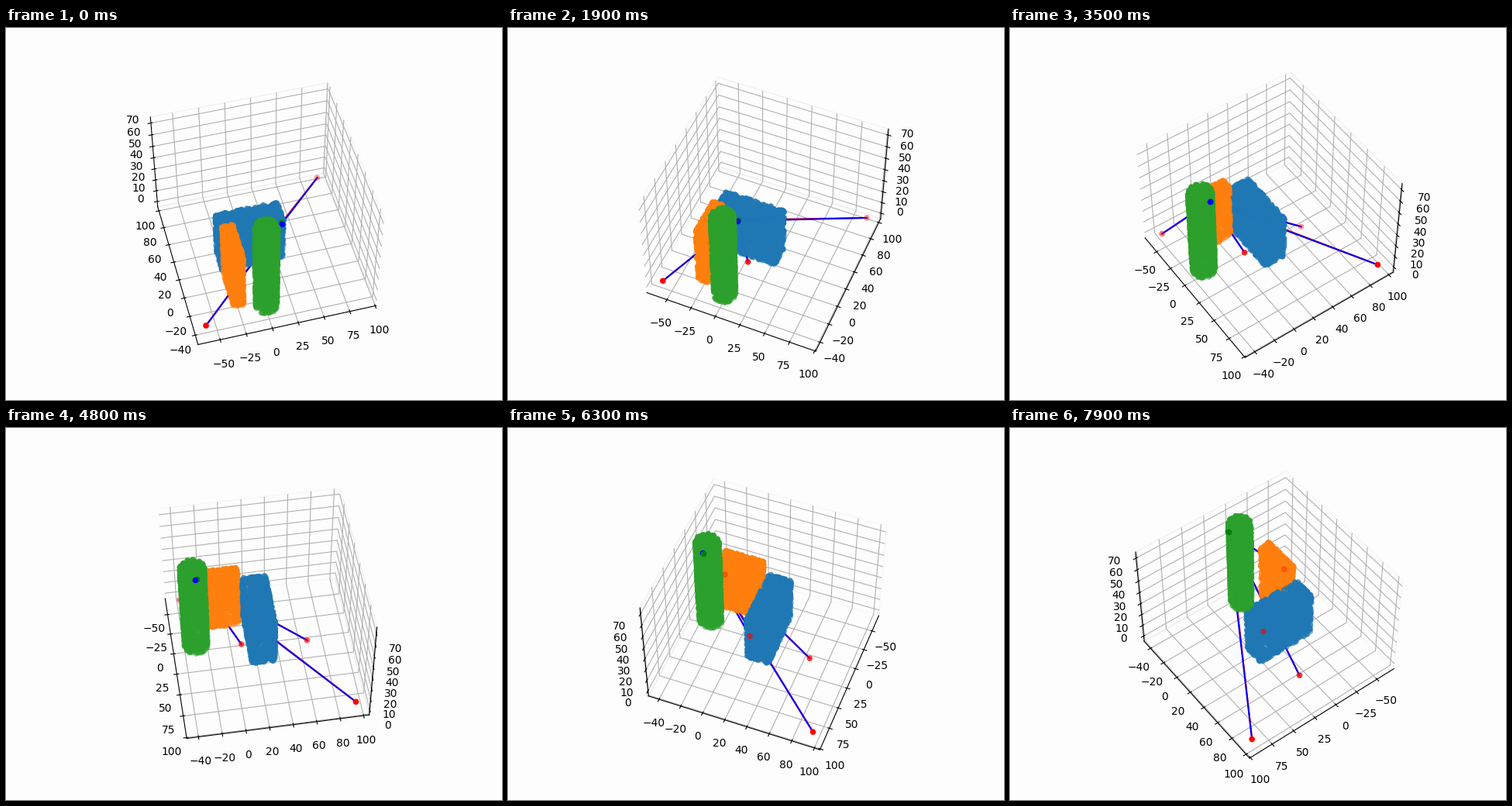
These frames come from a looping animation (640 by 480 pixels, 8000 ms). A matplotlib script:

```python
import numpy as np
import matplotlib.pyplot as plt
from matplotlib.animation import FuncAnimation

FRAMES = 80
rng = np.random.default_rng(4)


def box_shell(lo, hi, n):
    """Random points on the faces of a box."""
    lo, hi = np.array(lo, float), np.array(hi, float)
    size = hi - lo
    area = size.prod() / size
    pts = lo + rng.random((n, 3)) * size
    face = rng.choice(3, n, p=area / area.sum())
    side = rng.integers(0, 2, n)
    pts[np.arange(n), face] = np.where(side, hi[face], lo[face])
    return pts.T


def cylinder_shell(cx, cy, r, h, n):
    """Random points on the wall and both caps of an upright cylinder."""
    angle = rng.random(n) * 2 * np.pi
    z = rng.random(n) * h
    radius = np.full(n, float(r))
    cap = rng.random(n) < r / (r + h)
    radius[cap] = r * np.sqrt(rng.random(cap.sum()))
    z[cap] = rng.integers(0, 2, cap.sum()) * h
    return cx + radius * np.cos(angle), cy + radius * np.sin(angle), z


def padded(lo, hi):
    """Data margin of 5 %, then the usual 3D view margin."""
    pad = (hi - lo) * 0.05
    lo, hi = lo - pad, hi + pad
    pad = (hi - lo) / 48
    return lo - pad, hi + pad


fig = plt.figure(figsize=(6.4, 4.8), dpi=100, facecolor="#fdfdfd")
ax = fig.add_subplot(projection="3d", facecolor="#fdfdfd")
for axis in (ax.xaxis, ax.yaxis, ax.zaxis):
    axis.pane.fill = False

ax.scatter(*box_shell((-30, 15, 0), (30, 35, 35), 1400), color="C0")
ax.scatter(*box_shell((-30, -25, 0), (-20, 10, 45), 1100), color="C1")
ax.scatter(*cylinder_shell(0, -30, 10, 70, 1200), color="C2")

emitter = np.array([14.3, -29, 70])
centre = emitter + [0, 1.1, 0]
hits = np.array([(-60, -38, 0), (90, 95, 0), (5, 9, 0), (10, 66, 0)])

ax.scatter(*hits.T, color="r")
ax.scatter(*centre, color="g")
ax.scatter(*emitter, color="b")
for start, color in ((centre, "r"), (emitter, "b")):
    for hit in hits:
        ax.plot(*np.transpose([start, hit]), color=color)

ax.set_xlim(*padded(-60, 90))
ax.set_ylim(*padded(-40, 95))
ax.set_zlim(*padded(0, 70))


def update(i):
    ax.view_init(elev=50, azim=-105 + 2 * i)
    return []


anim = FuncAnimation(fig, update, frames=FRAMES, init_func=lambda: update(0),
                     interval=100, repeat=True, repeat_delay=0)
plt.show()
```
